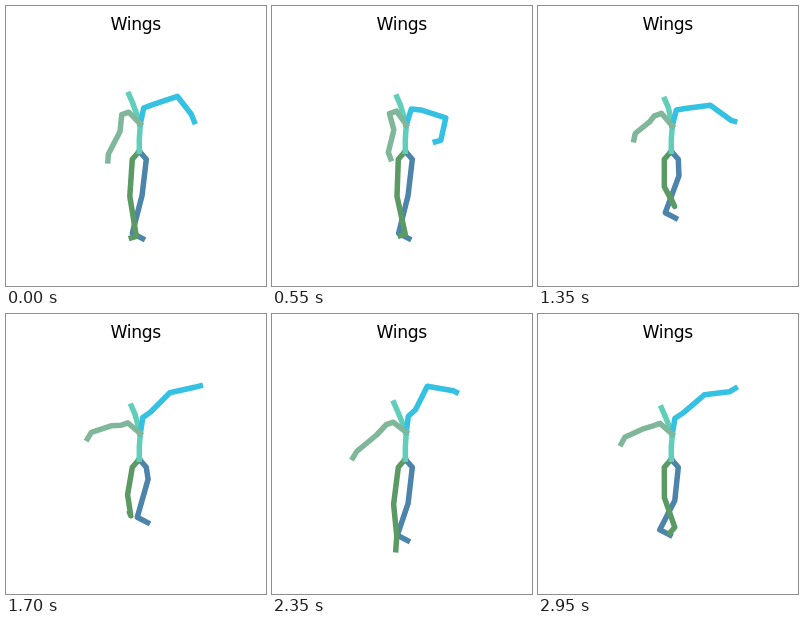
Recreate the animation shown at these times as an HTML page. Size 260 by 280 pixels, loop 3 s.

```html
<!DOCTYPE html>
<html lang="en">
<head>
<meta charset="utf-8">
<title>Wings</title>
<style>
  html, body { margin: 0; width: 100%; height: 100%; overflow: hidden; background: #fff; }
  svg { display: block; width: 260px; height: 280px; }
  text { font: 17.2px "DejaVu Sans", sans-serif; letter-spacing: -0.4px; text-anchor: middle; }
  polyline { fill: none; stroke-width: 5.5; stroke-linecap: square; stroke-linejoin: round; }
</style>
</head>
<body>
<svg viewBox="0 0 260 280">
  <text x="129.7" y="24">Wings</text>
  <g id="figure" transform="translate(.3 .3)"></g>
</svg>
<script>
const LOOP = 3000, STEP = 50;
const ROOT = [133, 145];

const clamp = n => Math.max(0, Math.min(1, n));
const pulse = (t, center, width) => Math.exp(-(((t - center) / width) ** 2));
const add = ([x, y], dx, dy) => [x + dx, y + dy];
const middle = (a, b) => [(a[0] + b[0]) / 2, (a[1] + b[1]) / 2];

// Harmonic mean of neighbouring slopes: smooth, without overshoot
const blend = (a, b) => a * b > 0 ? 2 * a * b / (a + b) : 0;

// Smooth motion through a few [time, x, y] keys
function path(...keys) {
  const last = keys.length - 1;
  const slope = (j, k) => (keys[j + 1][k] - keys[j][k]) / (keys[j + 1][0] - keys[j][0]);
  return t => {
    let i = 0;
    while (i < last - 1 && t >= keys[i + 1][0]) i++;
    const span = keys[i + 1][0] - keys[i][0];
    const u = clamp((t - keys[i][0]) / span);
    return [1, 2].map(k => {
      const here = slope(i, k);
      const m0 = i > 0 ? blend(slope(i - 1, k), here) : here;
      const m1 = i + 1 < last ? blend(here, slope(i + 1, k)) : here;
      return keys[i][k] + here * span * u * u * (3 - 2 * u)
        + span * u * (1 - u) * (m0 * (1 - u) - m1 * u);
    });
  };
}

// Only the leading joints have keys; the others follow from them.
const headAt = path([0, 122.6, 88], [1350, 126.5, 93], [2350, 121.6, 88.5], [2950, 123.2, 93.5]);
const elbowAt = path([0, 171, 90], [550, 173.5, 111.5], [950, 174.7, 112], [1350, 172, 99],
  [1700, 163.5, 78.5], [2350, 155, 72], [2950, 166, 80.5]);
const cyanWristAt = path([0, 185, 108], [550, 168.5, 134], [950, 174.7, 132.5], [1350, 192.7, 114],
  [1700, 188, 73], [1950, 180, 62], [2350, 181, 76.5], [2950, 191, 77.5]);
const cyanHandAt = path([0, 188, 115.5], [550, 163, 135.5], [950, 170, 131.5], [1350, 196.3, 115],
  [1700, 194, 71.5], [1950, 186, 59.5], [2350, 184, 78], [2950, 197, 74]);
const greenWristAt = path([0, 102, 148], [550, 116, 146], [950, 116, 141], [1350, 97, 127],
  [1700, 85, 118], [1950, 78, 119], [2350, 84.5, 137], [2950, 86.5, 123]);
const blueAnkleAt = path([0, 126, 227], [550, 126.3, 227], [950, 124, 221], [1350, 127, 206.5],
  [1700, 131, 203], [2350, 125, 221], [2750, 124, 220], [2950, 121.5, 215.5]);
const greenAnkleAt = path([0, 130, 230], [550, 133, 228], [950, 135.5, 223.5], [1350, 136.3, 200],
  [1700, 124.5, 201.5], [2350, 124.5, 222], [2750, 125.5, 222], [2950, 136.5, 213]);

function blueLeg(t) {
  const ankle = blueAnkleAt(t);
  const tuck = clamp((217 - ankle[1]) / 13);
  return [ROOT, [140, 153], [135.8 + 6 * tuck, 189 - 24 * tuck], ankle, add(ankle, 10.3, 5.3)];
}

function greenLeg(t) {
  const ankle = greenAnkleAt(t);
  const cross = ankle[0] - 124.5;
  const tuck = clamp((220 - ankle[1]) / 10);
  const knee = [121.3 + 0.4 * cross, 190 - 9.5 * tuck];
  const point = 1.5 - 12.5 * pulse(t, 1350, 380) + 12.5 * pulse(t, 2450, 480);
  return [ROOT, [126, 153], knee, ankle, add(ankle, -1 - 4 * clamp(cross / 5), point)];
}

function cyanArm(t, chest, raise) {
  const collar = add(chest, 5 - 3 * raise, -16);
  const shoulder = add(collar, 9.6 - 2.4 * raise, 1 - 7.5 * raise);
  return [chest, collar, shoulder, elbowAt(t), cyanWristAt(t), cyanHandAt(t)];
}

function greenArm(t, chest, raise) {
  const wrist = greenWristAt(t);
  const collar = add(chest, -9.8 - 3.2 * raise, -14 + 4 * raise);
  const shoulder = add(collar, -7, 2.5);
  const elbow = add(middle(shoulder, wrist), 5, -3);
  return [chest, collar, shoulder, elbow, wrist, add(wrist, 0.2 * (wrist[0] - 104), 6.5)];
}

function addLimb(color) {
  const line = document.createElementNS("http://www.w3.org/2000/svg", "polyline");
  line.setAttribute("stroke", color);
  document.getElementById("figure").append(line);
  return line;
}

const limbs = ["#4D84AA", "#5B9965", "#61CEB9", "#34C1E2", "#80B79A"].map(addLimb);

function draw(t) {
  const head = headAt(t);
  const chest = [134, 118.5 + 0.4 * (head[1] - 90)];
  const raise = (112 - elbowAt(t)[1]) / 40;
  const spine = [ROOT, [133, 133], chest, add(head, 3.5, 8), head];
  [blueLeg(t), greenLeg(t), spine, cyanArm(t, chest, raise), greenArm(t, chest, raise)]
    .forEach((joints, i) => limbs[i].setAttribute("points", joints.join(" ")));
}

const start = performance.now();
function tick() {
  const t = (performance.now() - start) % LOOP;
  draw(Math.floor(t / STEP) * STEP);
  requestAnimationFrame(tick);
}
tick();
</script>
</body>
</html>
```
